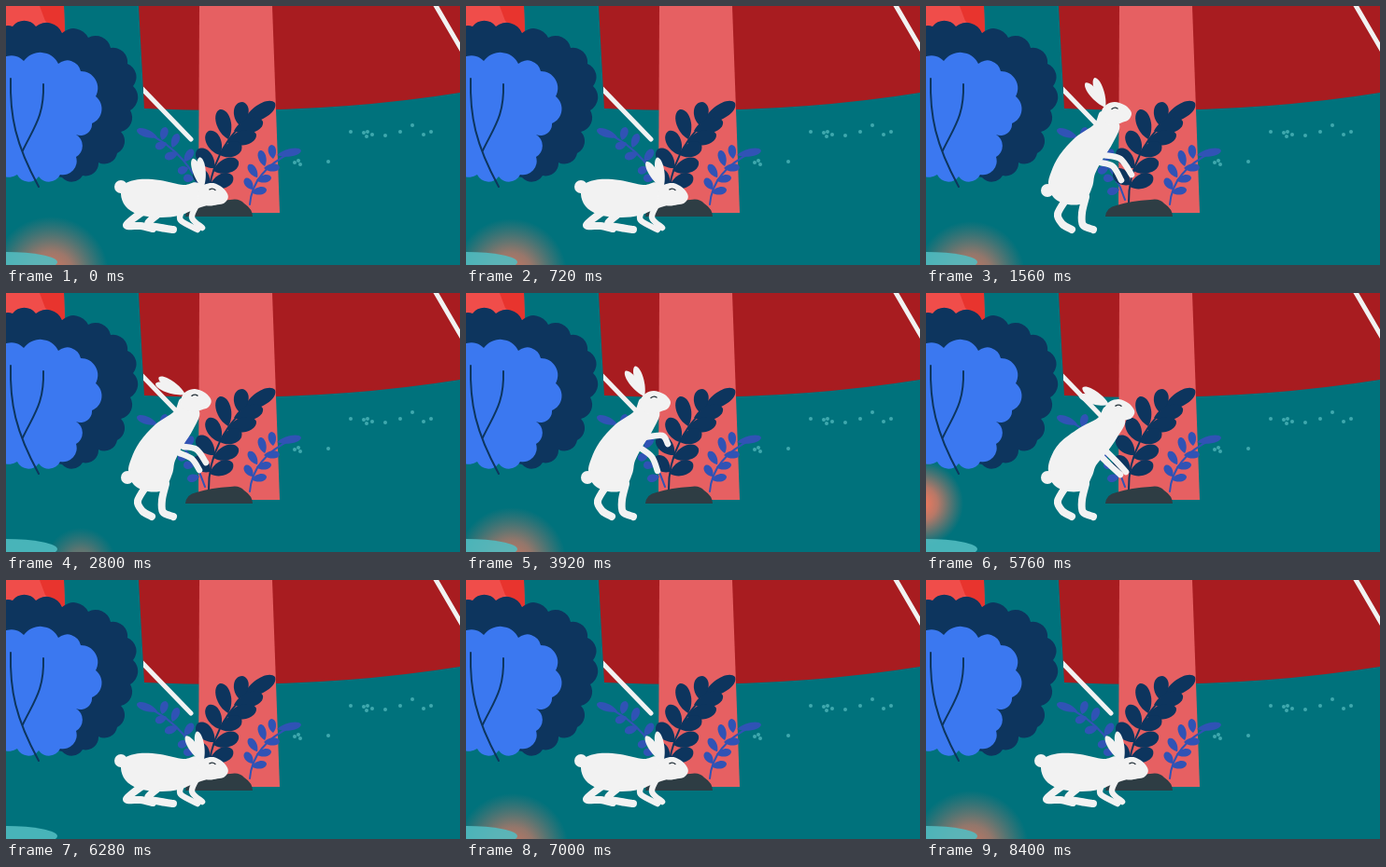
These frames come from a looping animation (486 px wide and 278 px high, 8.44 s). An HTML page with a canvas:

```html
<!DOCTYPE html>
<html lang="en">
<head>
<meta charset="utf-8">
<title>Rabbit by the tent</title>
<style>
html, body { margin: 0; width: 100%; height: 100%; overflow: hidden; background: #00727c; }
canvas { display: block; }
</style>
</head>
<body>
<canvas id="stage" width="486" height="278"></canvas>
<script>
const ctx = document.getElementById('stage').getContext('2d');
const LOOP = 8440;
const NAVY = '#0d355e', BLUE = '#3b78f0', LEAF = '#3053b5', WHITE = '#f2f2f2';

function fill(d, color) {
  ctx.fillStyle = color;
  ctx.fill(new Path2D(d));
}

function line(d, color, width) {
  ctx.strokeStyle = color;
  ctx.lineWidth = width;
  ctx.lineCap = ctx.lineJoin = 'round';
  ctx.stroke(new Path2D(d));
}

function ellipse(x, y, rx, ry, color) {
  ctx.fillStyle = color;
  ctx.beginPath();
  ctx.ellipse(x, y, rx, ry, 0, 0, 7);
  ctx.fill();
}

// Leaf from stem point (x, y) to its tip, fullest past the middle.
function leaf(x, y, tx, ty, width, color) {
  ctx.save();
  ctx.translate(x, y);
  ctx.rotate(Math.atan2(ty - y, tx - x));
  const n = Math.hypot(tx - x, ty - y), w = width * 0.7;
  fill(`M0 0C${n * .3} ${-w} ${n * .95} ${-w} ${n} 0C${n * .95} ${w} ${n * .3} ${w} 0 0Z`, color);
  ctx.restore();
}

function plant(stem, leaves, width, color) {
  line(stem, color, 2);
  for (const [x, y, tx, ty] of leaves) leaf(x, y, tx, ty, width, color);
}

// Rounded lobes between successive corner points.
function scallops(start, corners, bulge) {
  let [px, py] = start, d = `M${px} ${py}`;
  for (const [x, y] of corners) {
    const r = Math.hypot(x - px, y - py) * bulge;
    d += `A${r} ${r} 0 0 1 ${x} ${y}`;
    [px, py] = [x, y];
  }
  return d;
}

const darkBush = scallops([-10, 32], [[7, 22], [32, 22], [60, 29], [88, 34], [112, 45], [130, 62],
  [136, 86], [133, 112], [123, 135], [119, 158], [99, 168], [82, 182], [60, 184]], .62) + 'L-10 170Z';
const lightBush = scallops([-12, 66], [[19, 59], [56, 62], [80, 70], [96, 97], [92, 126], [75, 138],
  [75, 162], [58, 181], [35, 183], [12, 181], [-12, 170]], .58) + 'Z';

const DOTS = [[369, 135], [383, 136], [387, 135], [386, 140], [392, 138], [406, 139], [422, 135],
  [435, 128], [447, 138], [455, 135], [309, 168], [313, 166], [315, 170], [345, 167]];

const bigLeaves = [[254, 125, 288, 104], [250, 128, 253, 103], [244, 134, 275, 124], [238, 143, 229, 111],
  [236, 146, 268, 138], [229, 160, 217, 134], [229, 160, 252, 149], [223, 174, 205, 154],
  [222, 177, 249, 167], [218, 192, 202, 176], [218, 194, 243, 183]];
const rightLeaves = [[290, 160, 316, 155], [286, 164, 284, 149], [277, 172, 272, 155], [276, 174, 293, 173],
  [269, 184, 260, 170], [268, 187, 284, 184], [264, 197, 256, 185], [263, 200, 279, 197]];
const leftLeaves = [[162, 141, 140, 133], [167, 144, 171, 130], [178, 152, 184, 137], [172, 147, 160, 152],
  [184, 158, 170, 163], [191, 167, 200, 154], [195, 174, 184, 178], [201, 186, 190, 184], [203, 190, 212, 180],
  [207, 197, 194, 200]];

function scenery() {
  ctx.fillStyle = '#00727c';
  ctx.fillRect(0, 0, 486, 278);
  fill('M142 0L148 110Q330 118 486 93V0Z', '#a81c20');
  fill('M207 0H285L293 222H206Z', '#e66062');
  line('M458 -4L490 51', WHITE, 5);
  ctx.save();
  ctx.beginPath();
  ctx.rect(147, 0, 100, 278);
  ctx.clip();
  line('M143 86L198 143', WHITE, 5);
  ctx.restore();
  fill('M0 0H62L63 32H0Z', '#f04d4a');
  fill('M36 0H62L63 30L42 16Z', '#e8342e');
  for (const [x, y] of DOTS) ellipse(x, y, 2, 2, '#3fa9ae');
  fill(darkBush, NAVY);
  fill(lightBush, BLUE);
  line('M5 78C4 118 10 148 35 194', NAVY, 2);
  line('M40 84C41 118 30 130 18 155', NAVY, 2);
  plant('M213 208Q197 158 150 136', leftLeaves, 8, LEAF);
  plant('M217 212C216 178 233 137 270 114', bigLeaves, 15, NAVY);
  plant('M261 213Q264 177 306 157', rightLeaves, 8, LEAF);
  fill('M192 226Q193 216 204 214Q220 209 240 208Q250 206 255 212Q264 218 264 226Z', '#2e3d44');
}

// Limbs and body as x, y pairs; head holds eye x, y and tilt; ears hold two angles from upright.
const crouch = {
  body: [206, 190, 190, 192, 165, 187, 143, 186, 127, 191, 123, 202, 128, 215, 142, 224, 165, 227,
    185, 225, 198, 220, 212, 215, 222, 212, 230, 208],
  tail: [123, 194],
  legA: [146, 221, 129, 235, 144, 236, 157, 239],
  legB: [162, 224, 152, 234, 166, 238, 179, 240],
  armA: [205, 212, 199, 227, 210, 238],
  armB: [188, 220, 187, 230, 205, 240],
  head: [221, 197, 10],
  ears: [-33, -11]
};
const alert = { ...crouch, ears: [-19, -6] };
const stand = {
  body: [188, 113, 180, 127, 160, 141, 143, 160, 134, 178, 131, 192, 137, 206, 152, 213, 169, 211,
    178, 194, 181, 180, 190, 163, 200, 147, 207, 127],
  tail: [130, 198],
  legA: [151, 206, 141, 223, 146, 234, 156, 240],
  legB: [171, 205, 167, 222, 168, 235, 179, 240],
  armA: [191, 155, 210, 153, 216, 162],
  armB: [186, 166, 199, 176, 205, 191],
  head: [201, 112, 0],
  ears: [-37, -17]
};
const reach = { ...stand, armA: [190, 160, 208, 164, 220, 181], armB: [186, 168, 200, 172, 209, 187],
  head: [202, 110, 0], ears: [-39, -20] };
const sniff = { ...stand, armA: [190, 165, 204, 168, 214, 182], armB: [186, 172, 199, 178, 207, 190],
  head: [202, 110, 3], ears: [-70, -57] };
const lean = { ...stand,
  body: [193, 122, 184, 134, 164, 145, 143, 161, 133, 178, 131, 192, 137, 206, 152, 213, 169, 211,
    178, 196, 182, 185, 192, 173, 204, 156, 213, 136],
  armA: [191, 168, 205, 182, 214, 192], armB: [186, 174, 196, 184, 208, 195],
  head: [206, 121, 6], ears: [-73, -57] };

const RABBIT = [[0, alert], [880, crouch], [1320, reach], [1680, reach], [2150, stand], [2600, sniff],
  [2960, sniff], [3450, stand], [4000, stand], [4400, reach], [4900, stand], [5400, sniff],
  [5760, lean], [6180, crouch], [LOOP, crouch]];

// Glow: x, y, radius, strength.
const GLOW = [[0, [48, 288, 62, .85]], [1560, [48, 289, 58, .8]], [2300, [50, 289, 58, .8]],
  [2800, [80, 290, 38, .5]], [3400, [50, 289, 58, .8]], [4800, [46, 288, 60, .8]],
  [5760, [-6, 226, 46, 1]], [6200, [-50, 200, 40, .8]], [6201, [70, 330, 40, 0]],
  [7000, [50, 289, 60, .8]], [LOOP, [48, 288, 62, .8]]];

function between(steps, t) {
  let i = 0;
  while (i < steps.length - 2 && t >= steps[i + 1][0]) i++;
  const [t0, a] = steps[i], [t1, b] = steps[i + 1];
  const k = Math.min(1, Math.max(0, (t - t0) / (t1 - t0)));
  return [a, b, k * k * (3 - 2 * k)];
}

const mix = (a, b, k) => a.map((v, i) => v + (b[i] - v) * k);

// Catmull-Rom curve through x, y pairs.
function curve(p, closed) {
  const n = p.length / 2;
  const at = i => {
    const j = closed ? (i + n) % n : Math.min(n - 1, Math.max(0, i));
    return [p[2 * j], p[2 * j + 1]];
  };
  let d = `M${at(0)}`;
  for (let i = 0; i < (closed ? n : n - 1); i++) {
    const [a, b, c, e] = [at(i - 1), at(i), at(i + 1), at(i + 2)];
    const c1 = b.map((v, j) => v + (c[j] - a[j]) / 6);
    const c2 = c.map((v, j) => v - (e[j] - b[j]) / 6);
    d += `C${c1} ${c2} ${c}`;
  }
  return d;
}

const HEAD = [-14, 3, -9, -4, 0, -7, 10, -4, 16, 1, 18, 6, 15, 12, 8, 15, -2, 18, -12, 14];

function rabbit(t) {
  const [a, b, k] = between(RABBIT, t);
  const pose = {};
  for (const part in a) pose[part] = mix(a[part], b[part], k);

  ellipse(...pose.tail, 7, 7, WHITE);
  for (const limb of ['legA', 'legB']) line(curve(pose[limb]), WHITE, 8);
  for (const limb of ['armA', 'armB']) line(curve(pose[limb]), WHITE, 6.5);
  fill(curve(pose.body, true), WHITE);

  const [x, y, tilt] = pose.head;
  ctx.save();
  ctx.translate(x, y);
  for (const angle of pose.ears) {
    const r = angle * Math.PI / 180;
    leaf(-10, -1, -10 + 34 * Math.sin(r), -1 - 34 * Math.cos(r), 9, WHITE);
  }
  ctx.rotate(tilt * Math.PI / 180);
  fill(curve(HEAD, true), WHITE);
  line('M-3 .5Q0 -2 3 0', '#26333b', 1.4);
  ctx.restore();
}

function glow(t) {
  const [a, b, k] = between(GLOW, t);
  const [x, y, r, alpha] = mix(a, b, k);
  const g = ctx.createRadialGradient(x, y, 0, x, y, r);
  g.addColorStop(0, `rgba(255,120,90,${alpha})`);
  g.addColorStop(.4, `rgba(245,122,96,${alpha * .75})`);
  g.addColorStop(1, 'rgba(220,120,100,0)');
  ctx.fillStyle = g;
  ctx.fillRect(x - r, y - r, 2 * r, 2 * r);
}

function draw(now) {
  const t = now % LOOP;
  scenery();
  glow(t);
  ellipse(0, 275, 55, 11, 'rgba(82,190,194,.88)');
  rabbit(t);
}

const start = performance.now();
function tick() {
  draw(performance.now() - start);
  requestAnimationFrame(tick);
}
tick();
</script>
</body>
</html>
```
